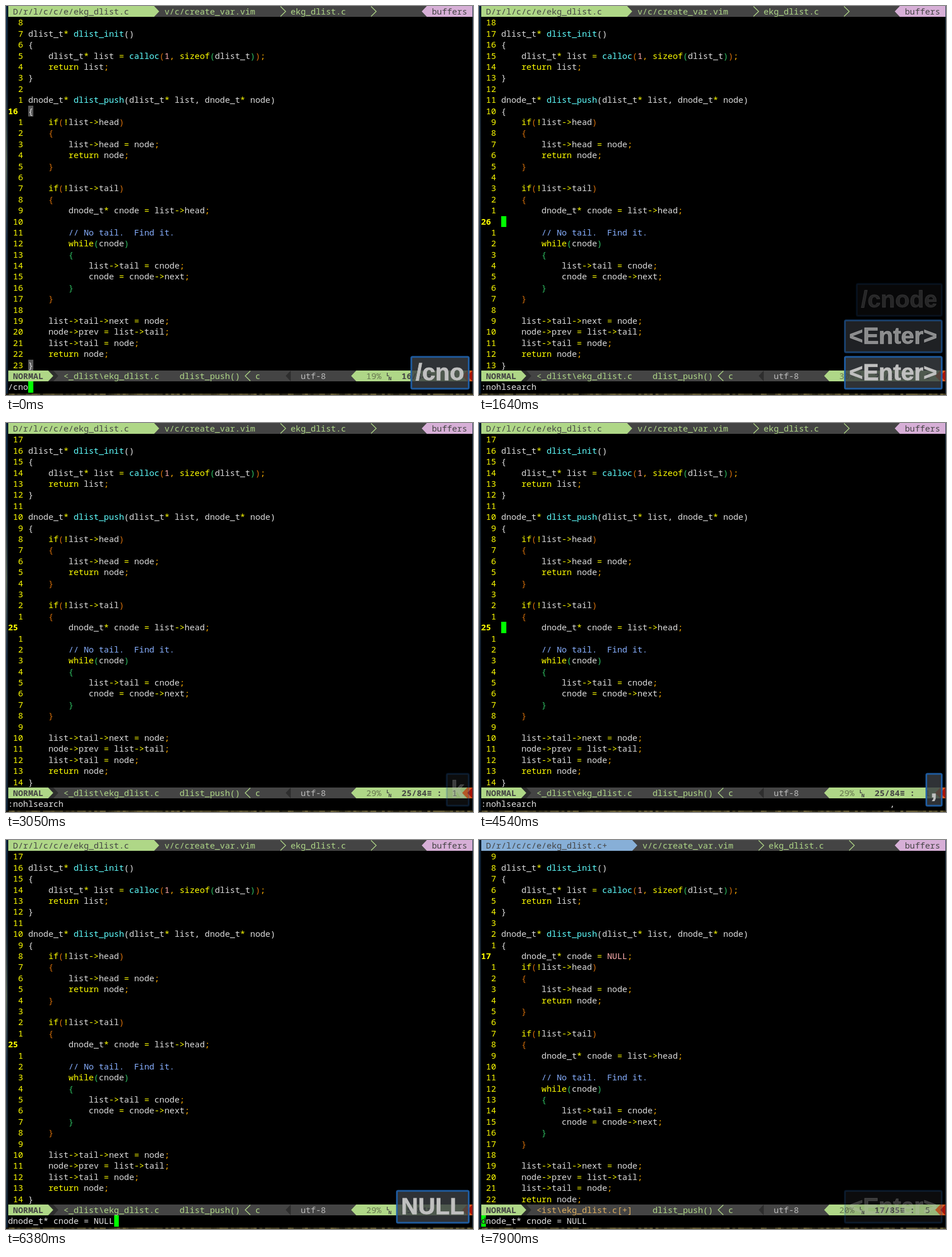
Write an HTML page with a canvas that moves like this. It is 820 by 683 pixels and loops after 8 s.

```html
<!DOCTYPE html>
<html lang="en">
<head>
<meta charset="utf-8">
<title>Editor session</title>
<style>
  html, body { margin: 0; width: 100%; height: 100%; overflow: hidden; background: #000; }
  canvas { display: block; }
</style>
</head>
<body>
<canvas id="stage" width="820" height="683"></canvas>
<script>
const ctx = document.getElementById('stage').getContext('2d');
const LOOP = 8000, COL = 8.86, ROW = 19.39, FIRST_LINE = 8, ROWS = 32;
const TABS = 0, STATUS = 33, CMD = 34, WIDTH = 92;
const GREEN = '#afd787', GREY = '#444444', DARK = '#2e2e2e', YELLOW = '#ffff00', CURSOR = '#00ff00';
const PINK = '#d7afd7', ORANGE = '#d75f1f', WHITE = '#e4e4e4';
const BRACKETS = [WHITE, '#d7700a', '#2fbf62'];
const MONO = '14.77px "Noto Sans Mono", monospace';

const code = `
dlist_t* dlist_init()
{
    dlist_t* list = calloc(1, sizeof(dlist_t));
    return list;
}

dnode_t* dlist_push(dlist_t* list, dnode_t* node)
{
    if(!list->head)
    {
        list->head = node;
        return node;
    }

    if(!list->tail)
    {
        dnode_t* cnode = list->head;

        // No tail.  Find it.
        while(cnode)
        {
            list->tail = cnode;
            cnode = cnode->next;
        }
    }

    list->tail->next = node;
    node->prev = list->tail;
    list->tail = node;
    return node;
}`.split('\n');
const edited = code.slice();
edited.splice(9, 0, '    dnode_t* cnode = NULL;');

// Screen updates happen only at these moments
const ticks = [0, 120, 270, 400, 1110, 1240, 1520, 1640, 1800, 1950, 2390, 2530, 2650, 2920, 3050,
  3200, 3320, 3720, 3850, 4270, 4540, 4790, 4910, 5590, 5860, 6010, 6130, 6260, 6380, 6520, 6640,
  6760, 7500, 7650, 7780, 7900];

const keys = [
  { born: 0, fade: 1390, text: t => '/cnode'.slice(0, t < 120 ? 4 : t < 270 ? 5 : 6) },
  { born: 400, fade: 1540, text: () => '<Enter>' },
  { born: 1110, fade: 2300, text: () => '<Enter>' },
  { born: 1800, fade: 2830, text: () => 'k' },
  { born: 4540, fade: 5950, text: t => t < 4790 ? ',' : ',d' },
  { born: 6010, fade: 7430, text: t => 'NULL'.slice(0, typed(t)) },
  { born: 6520, fade: 7675, text: () => '<Enter>' }
];
const cursorOff = [[2390, 2650], [3050, 3320], [3720, 3850], [4270, 4540], [5590, 5860]];

const X = col => 3.5 + col * COL;
const Y = row => 0.6 + row * ROW;
const typed = t => [6010, 6130, 6260, 6380].filter(k => t >= k).length;

function rect(x, y, w, h, color) {
  ctx.fillStyle = color;
  ctx.fillRect(x, y, w, h);
}

function cells(col, row, n, color) {
  const x = Math.round(X(col)), y = Math.floor(Y(row));
  rect(x, y, Math.round(X(col + n)) - x, Math.floor(Y(row + 1)) - y, color);
}

function write(text, col, row, color, bold) {
  ctx.font = (bold ? 'bold ' : '') + MONO;
  ctx.fillStyle = color;
  ctx.fillText(text, X(col), Y(row) + 14.5);
}

// Powerline separator one cell wide; dir 1 points right, -1 left
function arrow(col, row, dir, color, thin) {
  const top = Math.floor(Y(row)), bottom = Math.floor(Y(row + 1)), inset = thin ? 0.8 : 0;
  const base = Math.round(X(dir > 0 ? col : col + 1));
  ctx.beginPath();
  ctx.moveTo(base, top + inset);
  ctx.lineTo(base + dir * 9, (top + bottom) / 2);
  ctx.lineTo(base, bottom - inset);
  ctx.fillStyle = ctx.strokeStyle = color;
  ctx.lineWidth = 1.3;
  thin ? ctx.stroke() : ctx.fill();
}

function stateAt(t) {
  const s = { line: 25, col: '1', cmd: ':nohlsearch', done: t >= 6640, found: t >= 400 && t < 1110 };
  const on = !cursorOff.some(([a, b]) => t >= a && t < b);
  let cursor;
  if (t < 400) {
    s.line = 16;
    s.cmd = t < 270 ? '/cno' : '/cnode';
    cursor = [s.cmd.length, CMD];
  } else if (t < 1240) {
    if (s.found) s.cmd = '/cnode';
    s.col = '18';
    cursor = [21, 18];
  } else if (t < 1800) {
    s.line = 26;
    cursor = [4, 19];
  } else if (t < 4910) {
    cursor = [4, 18];
  } else if (!s.done) {
    s.cmd = 'dnode_t* cnode = ' + 'NULL'.slice(0, typed(t));
    cursor = [s.cmd.length, CMD];
  } else {
    s.line = 17;
    s.col = '5';
    s.cmd = 'dnode_t* cnode = NULL';
    cursor = [0, CMD];
  }
  s.cursor = on && cursor;
  return s;
}

function drawDesktop() {
  rect(0, 0, 820, 683, '#000');
  const edge = ctx.createLinearGradient(0, 0, 0, 683);
  ['#12304c', '#1d2c3c', '#5a6658', '#23344a', '#3c4644', '#10263e'].forEach((c, i) => edge.addColorStop(i / 5, c));
  rect(0, 0, 2.5, 683, edge);
  rect(2.5, 0, 1, 680, '#0c2038');
  rect(819, 0, 1, 680, '#2c4358');
  for (let x = 0; x < 820; x += 5) {
    const v = Math.abs(Math.sin(x * 12.99) * 437.58) % 1;
    rect(x, 680.5, 5, 2.5, `hsl(48, 32%, ${9 + v * 24}%)`);
  }
}

function drawTabs(modified) {
  const shift = modified ? 1 : 0, active = modified ? '#87afd7' : GREEN;
  cells(0, TABS, WIDTH, GREY);
  cells(0, TABS, 29 + shift, active);
  arrow(29 + shift, TABS, 1, active);
  write('D/r/l/c/c/e/ekg_dlist.c' + (modified ? '+' : ''), 1, TABS, GREY);
  write('v/c/create_var.vim', 31 + shift, TABS, GREEN);
  arrow(54 + shift, TABS, 1, GREEN, true);
  write('ekg_dlist.c', 56 + shift, TABS, GREEN);
  arrow(72 + shift, TABS, 1, GREEN, true);
  arrow(82, TABS, -1, PINK);
  cells(83, TABS, WIDTH - 83, PINK);
  write('buffers', 84, TABS, GREY);
}

function tokenColor(token, next, depth) {
  if (token.startsWith('//')) return '#87afff';
  if (/^(if|while|return|sizeof)$/.test(token)) return YELLOW;
  if (/^(\d+|NULL)$/.test(token)) return '#ffafaf';
  if (/^\w/.test(token)) return next === '(' ? '#5fffff' : '#dcdcdc';
  if (token === ';' || token === ',' && depth > 1) return '#ffaf00';
  return token === ',' ? WHITE : YELLOW;
}

function drawCode(s) {
  let depth = 0;
  (s.done ? edited : code).slice(0, ROWS).forEach((line, i) => {
    const row = i + 1, number = FIRST_LINE + i;
    const gap = String(Math.abs(number - s.line));
    if (number === s.line) write(String(number), 0, row, YELLOW, true);
    else write(gap, 3 - gap.length, row, YELLOW);

    for (const m of line.matchAll(/\/\/.*|\w+|\S/g)) {
      const token = m[0], col = 4 + m.index;
      let color;
      if (/[({]/.test(token)) color = BRACKETS[depth++];
      else if (/[)}]/.test(token)) color = BRACKETS[--depth];
      else color = tokenColor(token, line[m.index + token.length], depth);
      const hit = s.found && token === 'cnode';
      if (hit) cells(col, row, 5, YELLOW);
      if (s.line === 16 && m.index === 0 && (i === 8 || i === 31)) cells(col, row, 1, '#585858');
      if (hit && s.cursor[0] === col && s.cursor[1] === row) cells(col, row, 1, CURSOR);
      write(token, col, row, hit ? '#000' : color, hit);
    }
  });
}

function drawStatus(s) {
  const total = s.done ? 85 : 84;
  cells(0, STATUS, WIDTH, GREY);
  cells(0, STATUS, 9, DARK);
  cells(0, STATUS, 8, GREEN);
  arrow(8, STATUS, 1, GREEN);
  arrow(9, STATUS, 1, DARK);
  write('NORMAL', 1, STATUS, GREY, true);
  write(s.done ? '<ist\\ekg_dlist.c[+]' : '<_dlist\\ekg_dlist.c', 11, STATUS, s.done ? '#dfaf5f' : GREEN);
  write('dlist_push()', 34, STATUS, GREEN);
  arrow(47, STATUS, -1, GREEN, true);
  write('c', 49, STATUS, GREEN);
  arrow(55, STATUS, -1, DARK);
  write('utf-8', 58, STATUS, '#bcbcbc');
  arrow(68, STATUS, -1, GREEN);
  cells(69, STATUS, 22, GREEN);
  write(Math.floor(s.line / total * 100) + '%', 71, STATUS, '#66754f');
  ctx.font = 'bold 9px "Noto Sans Mono", monospace';
  ctx.fillStyle = GREY;
  ctx.fillText('L', 668, 650);
  ctx.fillText('N', 671.5, 657);
  write(`${s.line}/${total}`, 78, STATUS, GREY, true);
  write('≡ :', 83, STATUS, GREY, true);
  write(s.col.padStart(2), 87, STATUS, GREY);
  arrow(90, STATUS, -1, ORANGE);
  cells(91, STATUS, 1, ORANGE);
  arrow(91, STATUS, -1, '#a81408');
}

function drawCommand(s, t) {
  if (s.cursor && !s.found) cells(...s.cursor, 1, CURSOR);
  write(s.cmd, 0, CMD, WHITE);
  if (s.done) write('d', 0, CMD, '#000');
  if (t >= 4540 && t < 4910) write(',', 81, CMD, WHITE);
}

function drawKeys(t) {
  const born = keys.filter(k => t >= k.born);
  born.forEach((key, i) => {
    const alpha = Math.min(1, 1 - (t - key.fade) / 300);
    if (alpha <= 0) return;
    const y = 614 - 64 * (born.length - 1 - i), text = key.text(t);
    ctx.font = 'bold 41.5px "Liberation Sans", Arial, sans-serif';
    const w = ctx.measureText(text).width, x = 804.5 - w;
    ctx.globalAlpha = alpha;
    ctx.beginPath();
    ctx.roundRect(x - 7.5, y + 2, w + 15.5, 56, 2);
    ctx.fillStyle = 'rgba(58, 61, 66, .82)';
    ctx.fill();
    ctx.strokeStyle = 'rgba(32, 98, 172, .9)';
    ctx.lineWidth = 3;
    ctx.stroke();
    ctx.fillStyle = ctx.strokeStyle = '#c0c0c0';
    ctx.lineWidth = 0.8;
    ctx.fillText(text, x, y + 43);
    ctx.strokeText(text, x, y + 43);
    ctx.globalAlpha = 1;
  });
}

function draw() {
  const now = performance.now() % LOOP;
  const t = ticks.findLast(k => k <= now);
  const s = stateAt(t);
  drawDesktop();
  drawTabs(s.done);
  drawCode(s);
  drawStatus(s);
  drawCommand(s, t);
  drawKeys(t);
  requestAnimationFrame(draw);
}
draw();
</script>
</body>
</html>
```
